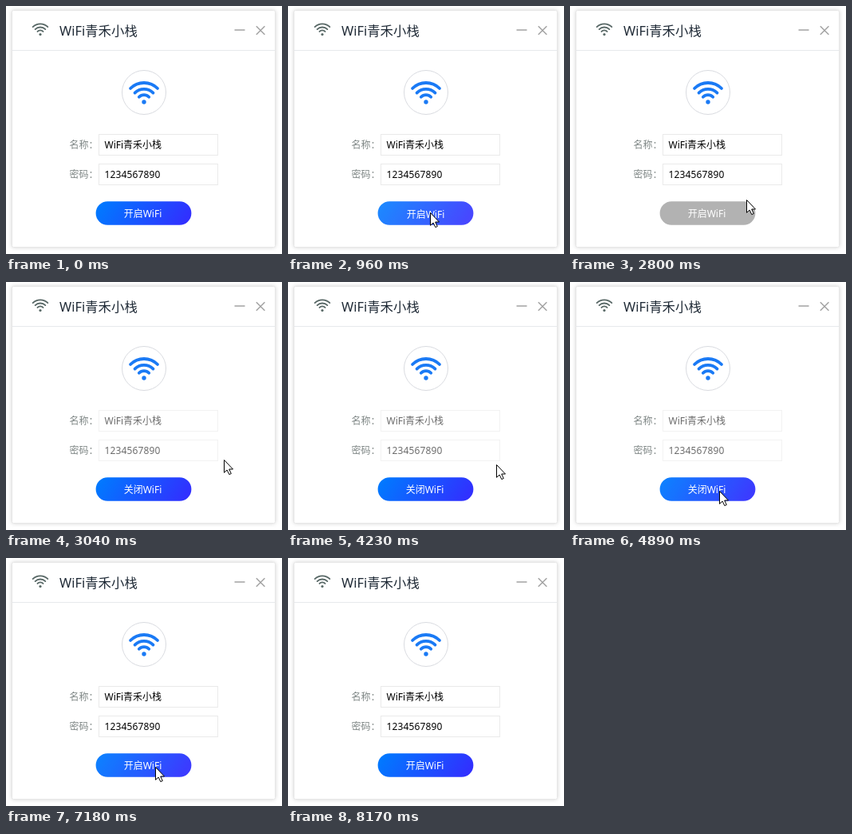
Animation of 346 by 310 pixels, one loop 8720 ms. Source, as an HTML page:

```html
<!DOCTYPE html>
<html lang="zh-CN">
<head>
<meta charset="utf-8">
<title>WiFi</title>
<style>
  html, body { margin: 0; width: 100%; height: 100%; overflow: hidden; background: #fff; }
  svg { display: block; width: 346px; height: 310px; }
  text { font: 12px "Noto Sans", "Noto Sans CJK SC", "Noto Sans CJK", sans-serif; }
  .window { fill: #fff; stroke: #e6e6e6; filter: drop-shadow(0 0 2.5px rgba(0, 0, 0, .17)); }
  .title { font-size: 16.4px; fill: #1f2a36; }
  .label { fill: #7d8584; }
  .digits { letter-spacing: .14px; }
  .field rect { fill: #fff; stroke: #eaeaea; }
  .field text { fill: #000; }
  .locked rect { stroke: #f2f2f2; }
  .locked text { fill: #6d6d6d; }
  .caption { fill: #fff; font-weight: 500; }
  .signal path { fill: none; stroke: currentColor; stroke-linecap: round; }
  .signal circle { fill: currentColor; }
  .tools { fill: none; stroke: #a3a3a3; stroke-width: 1.5; }
</style>
</head>
<body>
<svg viewBox="0 0 346 310">
  <defs>
    <linearGradient id="blue" gradientUnits="userSpaceOnUse" x1="127" y1="230" x2="219" y2="288">
      <stop offset="0" stop-color="#007aff"/>
      <stop offset="1" stop-color="#332dff"/>
    </linearGradient>
  </defs>
  <rect class="window" x="7.5" y="5.5" width="330" height="296" rx="2"/>
  <path d="M8 55.5H337" stroke="#e7e9ec"/>
  <g class="signal" id="small" color="#586866"></g>
  <text class="title" x="67" y="37">WiFi青禾小栈</text>
  <path class="tools" d="M286.5 30H299.5M313.8 25.2L324.4 35.8M324.4 25.2L313.8 35.8"/>

  <circle cx="173" cy="108" r="27.5" fill="#fff" stroke="#d9dbe0"/>
  <g class="signal" id="large" color="#1a7af5"></g>

  <text class="label" x="79.5" y="178">名称：</text>
  <text class="label" x="79.5" y="215">密码：</text>
  <g id="fields" class="field">
    <rect x="116.5" y="160.5" width="149" height="26"/>
    <text x="123.5" y="178">WiFi青禾小栈</text>
    <rect x="116.5" y="197.5" width="149" height="26"/>
    <text class="digits" x="123.5" y="215">1234567890</text>
  </g>

  <rect id="button" x="112.6" y="244.2" width="119.8" height="29.6" rx="14.8"/>
  <rect id="tint" x="112.6" y="244.2" width="119.8" height="29.6" rx="14.8" fill="#fff"/>
  <text id="caption" class="caption" x="147.7" y="264"></text>

  <path id="cursor" d="M.5 .5V16.3L4.1 13L6.8 18.6L9.3 17.5L6.7 12H11.5Z" fill="#fff" stroke="#000"/>
</svg>
<script>
const LOOP = 8720;
const PRESS = 220;
const ENTER = 180, LEAVE = 8170;
const $ = id => document.getElementById(id);

// Each click locks the button until the sharing state flips at `done`.
const clicks = [{ down: 960, done: 3040 }, { down: 6310, done: 7180 }];

// The pointer glides to each spot in a few visible hops.
const entry = { x: 199, y: 316 };
const glides = [
  { start: 180, span: 460, hops: 5, ease: 1.5, x: 178, y: 258 },
  { start: 2800, span: 240, hops: 3, ease: 1.5, x: 273, y: 222 },
  { start: 4230, span: 660, hops: 7, ease: 1, x: 187, y: 261 },
  { start: 7310, span: 310, hops: 4, ease: 1.5, x: 250, y: 277 }
];

function pointerAt(t) {
  let { x, y } = entry;
  for (const g of glides) {
    if (t < g.start) break;
    const hop = 1 + Math.floor((t - g.start) / g.span * (g.hops - 1));
    const p = 1 - (1 - Math.min(hop / g.hops, 1)) ** g.ease;
    x += (g.x - x) * p;
    y += (g.y - y) * p;
  }
  return { x: Math.round(x), y: Math.round(y) };
}

function inButton(x, y) {
  const dx = x - Math.min(Math.max(x, 127.5), 217.5);
  return Math.hypot(dx, y - 259) < 15;
}

function drawSignal(id, x, y, radii, width, dot) {
  const arcs = radii.map(r => {
    const d = r * Math.SQRT1_2;
    return `<path stroke-width="${width}" d="M${x - d} ${y - d}A${r} ${r} 0 0 1 ${x + d} ${y - d}"/>`;
  });
  $(id).innerHTML = arcs.join('') + `<circle cx="${x}" cy="${y}" r="${dot}"/>`;
}

function render(t) {
  const { x, y } = pointerAt(t);
  const visible = t >= ENTER && t < LEAVE;
  const click = clicks.find(c => t >= c.down && t < c.done);
  const pressed = click && t < click.down + PRESS;
  const busy = click && !pressed;
  const on = t >= clicks[0].done && t < clicks[1].done;
  const hover = visible && inButton(x, y);

  $('cursor').setAttribute('visibility', visible ? 'visible' : 'hidden');
  $('cursor').setAttribute('transform', `translate(${x} ${y})`);
  $('button').setAttribute('fill', busy ? '#b2b2b2' : 'url(#blue)');
  $('tint').setAttribute('opacity', busy ? 0 : pressed ? .11 : hover ? .05 : 0);
  $('caption').textContent = (on ? '关闭' : '开启') + 'WiFi';
  $('caption').setAttribute('transform', pressed ? 'translate(1 1)' : '');
  $('fields').setAttribute('class', on ? 'field locked' : 'field');
}

drawSignal('small', 43, 35.5, [13.2, 9, 5], 1.8, 1.6);
drawSignal('large', 173, 120, [24, 16.2, 8.8], 3.8, 2.7);

const start = performance.now();
function tick() {
  render((performance.now() - start) % LOOP);
  requestAnimationFrame(tick);
}
render(0);
requestAnimationFrame(tick);
</script>
</body>
</html>
```
